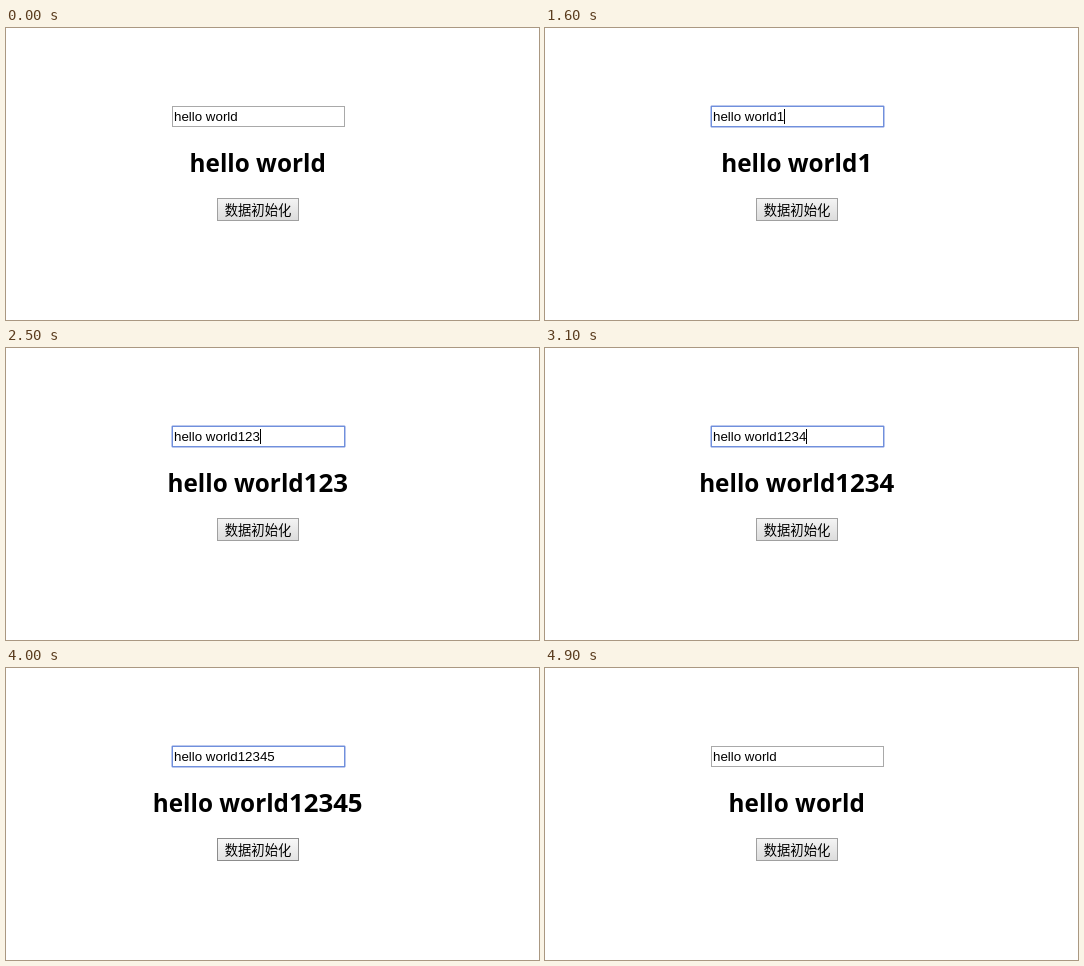
Write an HTML page that moves like this. It is 533 by 292 pixels and loops after 6200 ms.

```html
<!DOCTYPE html>
<html lang="zh-CN">
<head>
<meta charset="utf-8">
<title>Two-way binding</title>
<style>
  html, body { margin: 0; width: 100%; height: 100%; overflow: hidden; background: #fff; }
  svg { display: block; }
  rect { shape-rendering: crispEdges; }
  text { white-space: pre; }
  .value { font: 13.333px "Liberation Sans", Arial, sans-serif; }
  .title { font: 700 24.3px "Open Sans", "Noto Sans", sans-serif; text-anchor: middle; }
  .digits { font-size: 25.8px; }
  .label { font: 13.333px "Noto Sans CJK SC", "Noto Sans CJK", sans-serif; text-anchor: middle; }
</style>
</head>
<body>
<svg width="533" height="292" viewBox="0 0 533 292">
  <defs>
    <linearGradient id="normal" x2="0" y2="1"><stop stop-color="#f4f4f4"/><stop offset="1" stop-color="#dcdcdc"/></linearGradient>
    <linearGradient id="hover" x2="0" y2="1"><stop stop-color="#f8f8f8"/><stop offset="1" stop-color="#e3e3e3"/></linearGradient>
    <linearGradient id="pressed" x2="0" y2="1"><stop stop-color="#dedede"/><stop offset="1" stop-color="#f4f4f4"/></linearGradient>
  </defs>

  <rect id="field" x="166.5" y="78.5" width="172" height="20" fill="#fff"/>
  <rect id="ring" x="165.5" y="77.5" width="174" height="22" rx="1.5" fill="none"
        stroke="#5577d4" stroke-opacity=".4" style="shape-rendering: auto"/>
  <text class="value" id="value" x="168" y="93"></text>
  <rect id="caret" y="81" width="1" height="15"/>

  <text class="title" x="251.7" y="144">hello world<tspan class="digits" id="digits"></tspan></text>

  <rect id="button" x="211.5" y="170.5" width="81" height="22"/>
  <text class="label" x="252" y="186.5">数据初始化</text>
</svg>
<script>
  const LOOP = 6200;
  const BASE = "hello world";
  const BASE_WIDTH = 63.7, DIGIT_WIDTH = 7.414;
  const BORDER = { normal: "#a0a0a0", hover: "#8c8c8c", pressed: "#949494" };

  // Each step changes only the properties it lists.
  const steps = [
    [0, { digits: "", focus: false, caret: false, button: "normal" }],
    [1300, { focus: true, caret: true }],
    [1600, { digits: "1" }],
    [2000, { digits: "12" }],
    [2500, { digits: "123" }],
    [3000, { caret: false }],
    [3100, { digits: "1234", caret: true }],
    [3400, { digits: "12345" }],
    [3900, { caret: false }],
    [4000, { button: "hover" }],
    [4300, { caret: true }],
    [4500, { focus: false, caret: false, button: "pressed" }],
    [4600, { digits: "", button: "hover" }],
    [4900, { button: "normal" }]
  ];

  const el = id => document.getElementById(id);
  const show = (id, on) => el(id).setAttribute("visibility", on ? "visible" : "hidden");

  function stateAt(time) {
    const past = steps.filter(([start]) => start <= time).map(([, change]) => change);
    return Object.assign({}, ...past);
  }

  function render({ digits, focus, caret, button }) {
    el("value").textContent = BASE + digits;
    el("digits").textContent = digits;
    el("caret").setAttribute("x", Math.round(168.1 + BASE_WIDTH + DIGIT_WIDTH * digits.length));
    show("caret", caret);
    show("ring", focus);
    el("field").setAttribute("stroke", focus ? "#7090dc" : "#a9a9a9");
    el("button").setAttribute("fill", `url(#${button})`);
    el("button").setAttribute("stroke", BORDER[button]);
  }

  const origin = performance.now();
  function tick() {
    render(stateAt((performance.now() - origin) % LOOP));
    requestAnimationFrame(tick);
  }
  tick();
</script>
</body>
</html>
```
